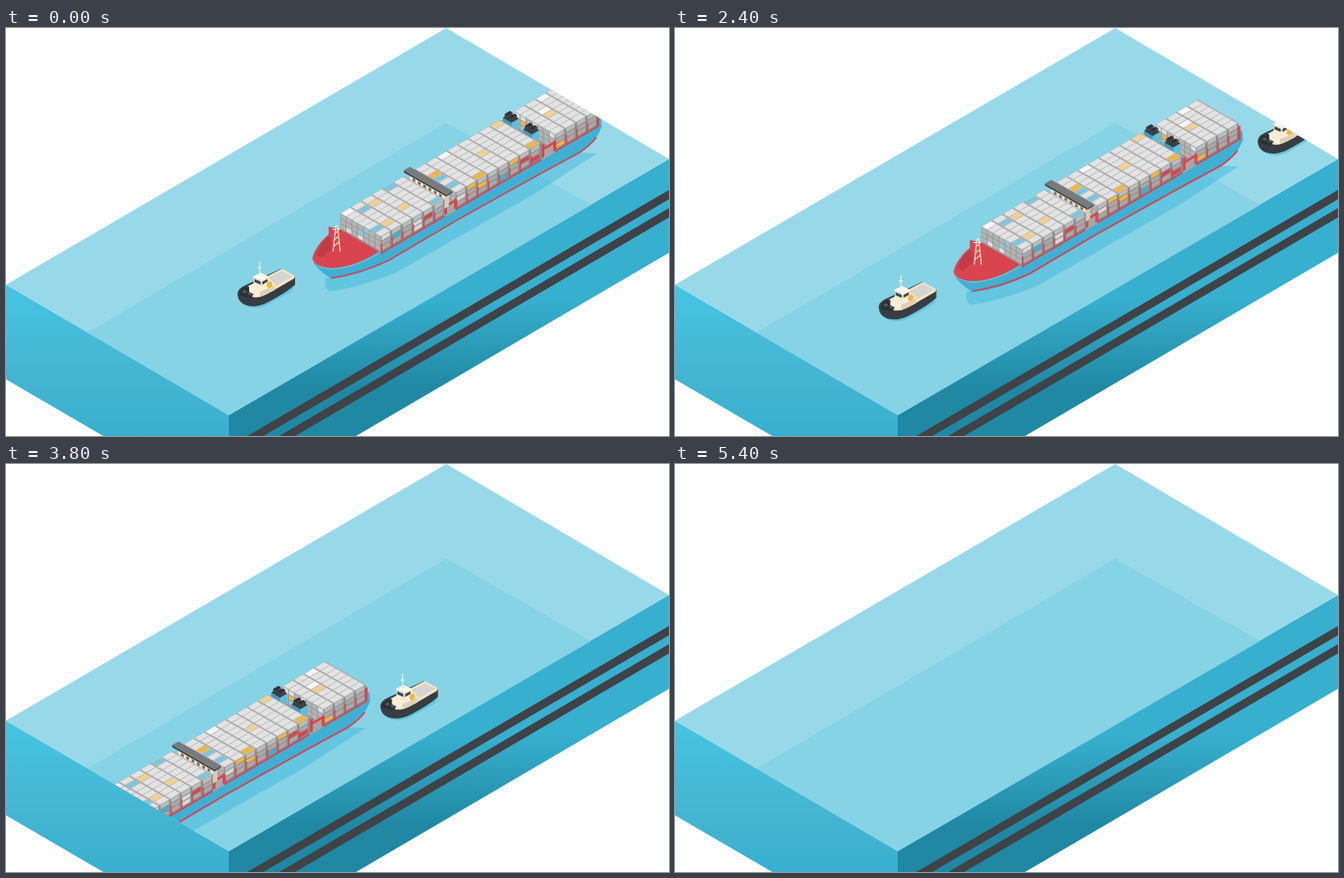
Animation, 750 px wide and 461 px high, one loop 5440 ms. Source, as an HTML page with a canvas:

```html
<!DOCTYPE html>
<html lang="en">
<head>
<meta charset="utf-8">
<title>Container ship and tugs</title>
<style>
html, body { margin: 0; width: 100%; height: 100%; overflow: hidden; background: #fff; }
canvas { display: block; }
</style>
</head>
<body>
<canvas id="stage" width="750" height="461"></canvas>
<script>
(() => {
const ctx = document.getElementById('stage').getContext('2d');
const LOOP = 5440, STEP = 40, SPEED_UP = 2430;
const RED = '#d9444e', BLUE = '#3fb0d3', CREAM = '#f3e5c9', ORANGE = '#f0b545', DARK = '#3e4347';
const WIDTH = 46, HEIGHT = 18;

let seed = 1;
function rnd() {
  seed = (seed * 16807) % 2147483647;
  return seed / 2147483647;
}

function poly(color, ...pts) {
  ctx.beginPath();
  pts.forEach(p => ctx.lineTo(p[0], p[1]));
  ctx.closePath();
  ctx.fillStyle = color;
  ctx.fill();
}

function fill(color, d) {
  ctx.fillStyle = color;
  ctx.fill(new Path2D(d));
}

function stroke(color, width, d) {
  ctx.strokeStyle = color;
  ctx.lineWidth = width;
  ctx.stroke(new Path2D(d));
}

// Ship axes: u runs aft, v runs to the near side, z runs up.
const iso = (u, v, z) => [217 + u + v, 304 - 0.585 * u + 0.57 * v - z];

const roof = (c, u0, u1, v0, v1, z) =>
  poly(c, iso(u0, v0, z), iso(u1, v0, z), iso(u1, v1, z), iso(u0, v1, z));
const side = (c, u0, u1, v, z0, z1) =>
  poly(c, iso(u0, v, z0), iso(u1, v, z0), iso(u1, v, z1), iso(u0, v, z1));
const front = (c, u, v0, v1, z0, z1) =>
  poly(c, iso(u, v0, z0), iso(u, v1, z0), iso(u, v1, z1), iso(u, v0, z1));

function box(u0, u1, v0, v1, z0, z1, colors) {
  side(colors[2], u0, u1, v1, z0, z1);
  front(colors[1], u0, v0, v1, z0, z1);
  roof(colors[0], u0, u1, v0, v1, z1);
}

function pick(list, plain, chance) {
  return rnd() < chance ? list[Math.floor(rnd() * list.length)] : plain;
}

function stack(u0, bays) {
  const bay = 12, cols = 7, cw = WIDTH / cols, u1 = u0 + bays * bay;
  box(u0, u1, 0, WIDTH, -HEIGHT, 0, ['#a8a8a8', '#979797', '#8b8b8b']);

  for (let r = 0; r < 3; r++) {
    for (let c = 0; c < cols; c++) {
      const z = -0.5 - r * 5.6;
      front(pick(['#8ccbdc', ORANGE, '#dedede'], '#b4b4b4', 0.25),
        u0, c * cw + 0.5, (c + 1) * cw - 0.5, z - 4.6, z);
    }
  }

  for (let b = bays - 1; b >= 0; b--) {
    const a = u0 + b * bay;
    for (let r = 0; r < 3; r++) {
      const z = -0.5 - r * 5.6;
      side(pick([BLUE, RED, ORANGE, '#d8d8d8'], r ? '#a9a9a9' : '#bcbcbc', 0.17),
        a + 0.8, a + bay - 1.6, WIDTH, z - 4.5, z);
    }
    side(RED, a, a + 1.6, WIDTH, -HEIGHT - 2, -8);
    for (let c = 0; c < cols; c++) {
      const v = c * cw;
      roof('#c6c6c6', a + 0.4, a + bay - 1, v, v + cw, 0);
      roof(pick([ORANGE, '#7cc6dc', '#f6f6f6', '#7cc6dc', '#f2d18e'], '#e3e3e3', 0.2),
        a + 0.6, a + bay - 1.4, v + 0.4, v + cw - 0.7, 0);
    }
  }
  side(RED, u0, u1, WIDTH, -HEIGHT - 2, -HEIGHT);
}

function funnel(v) {
  box(181, 189, v, v + 10, -9, 4, ['#34383c', '#3a9dbd', '#59bfdb']);
  front('#2d5666', 181, v + 1.5, v + 8.5, -2, 0);
  box(182, 188, v + 1, v + 4, 4, 8, ['#2c3034', DARK, DARK]);
  box(182, 188, v + 6, v + 9, 4, 8, ['#2c3034', DARK, DARK]);
}

function bridge() {
  box(75, 80, 4, 43, -14, 3, [CREAM, CREAM, '#d9ccb3']);
  for (let v = 7; v < 40; v += 6) front('#6d6b66', 75, v, v + 3, -3, 0);
  box(73, 80, -1, 47, 3, 5.5, ['#777b7e', '#43474b', '#53575b']);
}

function gap(u0, u1) {
  roof('#8e9092', u0, u1, 0, WIDTH, -HEIGHT);
  side('#a7a7a7', u0, u1, WIDTH, -HEIGHT - 2, -8);
  side(RED, u0, u1, WIDTH, -10, -7);
  side(RED, u0, u0 + 3, WIDTH, -HEIGHT, -3);
  side(RED, u1 - 2, u1, WIDTH, -HEIGHT, -6);
}

function ship() {
  seed = 4271;
  fill('rgba(52,178,214,0.42)',
    'M200 378 Q199 388 204 392 Q228 391 280 371 L440 280 L508 236 L488 235 L350 311 L270 358 Z');
  fill(BLUE,
    'M185 354 Q187 365 207 378 Q240 374 272 358 L350 312 L440 262 L488 236 Q506 224 513 206 L512 195 L262 340 Z');
  stroke(RED, 1.8, 'M207 377 Q240 372 272 357 L350 311 L440 261 L488 235 Q500 227 507 218');
  fill(RED,
    'M204 319 L218 322 L263 345 Q242 360 222 364 Q200 368 188 361 Q183 354 190 344 Q196 334 204 328 Z');
  fill('#c03c47', 'M204 330 L207 331 L207 345 L196 354 L190 351 Q194 338 204 330 Z');
  stroke('#b4bdc3', 0.8, 'M185 355 Q188 365 208 367 Q230 366 262 349');

  stack(197, 4);
  side(RED, 244, 247, WIDTH, -HEIGHT - 2, -4);
  gap(182, 197);
  funnel(3);
  funnel(26);
  stack(85, 8);
  gap(72, 85);
  bridge();
  stack(0, 6);

  stroke(CREAM, 1.2, 'M209 347 L212 318 L214 318 L217 347 M210 341 L216 336 M210 334 L215 330 M211 327 L215 323 M208 322 H217');
}

function tug() {
  fill('rgba(52,178,214,0.45)', 'M264 306 Q270 320 292 315 L324 297 L327 288 Z');
  fill('#383d42',
    'M262 302 Q261 295 270 291 L311 272 L327 281 V290 Q317 299 296 310 Q282 317 271 313 Q263 310 262 302 Z');
  fill(CREAM, 'M273 292 L312 272 L327 280 L326 283 L300 298 Q287 306 279 304 Z');
  fill('#d5d4d0', 'M297 282 L312 274.5 L324 280.5 L306 291 Z');
  fill('#2b3035', 'M264 300 Q265 294 274 292 L283 298 L277 304 Q267 306 264 300 Z');
  fill('#555b60', 'M267 298 l3 -2 l3 2 l-3 2 Z M273 300 l3 -2 l3 2 l-3 2 Z');
  fill('#f8eed8', 'M275 292 L288 286 L304 292 V296 L286 304 L275 298 Z');
  fill('#dfd0b3', 'M287 298 L304 291 V296 L287 304 Z');
  fill('#f7ecd5', 'M280 282 L288 285 L297 281 V290 L289 295 L280 290 Z');
  fill('#41484e', 'M281 283.5 L288 286.5 V290 L281 287 Z M290 286.5 L296 283.5 V286.5 L290 290 Z');
  fill('#fff9ea', 'M279 281 L288 276.5 L298 281 L289 285.5 Z');
  fill(ORANGE, 'M295 288 L299 286 L301 288 V292 L297 294 L295 292 Z');
  stroke('#f2eee3', 1.2, 'M287 264 V280 M284.5 271 H289.5');
}

function water() {
  ctx.fillStyle = '#fff';
  ctx.fillRect(0, 0, 750, 461);

  const left = ctx.createLinearGradient(0, 290, 0, 461);
  left.addColorStop(0, '#45c5e3');
  left.addColorStop(0.6, '#45b5d1');
  left.addColorStop(1, '#38b0d0');
  poly(left, [0, 290], [252, 437], [252, 461], [110, 461], [0, 397]);

  const right = ctx.createLinearGradient(0, 308, 0, 408);
  right.addColorStop(0, '#37afcf');
  right.addColorStop(1, '#2088a3');
  poly(right, [252, 437], [750, 148], [750, 254], [396, 461], [252, 461]);
  poly('#3f4246', [750, 183], [750, 193.5], [291, 461], [273, 461]);
  poly('#3f4246', [750, 203.5], [750, 214], [327, 461], [309, 461]);

  poly('#98d9e9', [0, 290], [498, 0], [750, 148], [252, 437.5]);
  poly('#86d3e6', [498, 107], [662, 200], [252, 437.5], [92, 344]);
}

function at(x, y, draw) {
  ctx.save();
  ctx.translate(x, y);
  draw();
  ctx.restore();
}

function render(t) {
  const slow = Math.min(t, SPEED_UP), fast = Math.max(0, t - SPEED_UP);
  const x = -0.0131 * slow - 0.168 * fast;
  const y = 0.0062 * slow + 0.1035 * fast;

  water();
  ctx.save();
  ctx.clip(new Path2D('M0 290 L498 0 L750 148 L252 437.5 Z'));
  if (t > 2240) at((4760 - t) * 0.1683, 73 - (4760 - t) * 0.104, tug);
  at(161 + x, y - 94.5, ship);
  at(x, y, tug);
  ctx.restore();
}

const start = performance.now();
function tick() {
  const t = (performance.now() - start) % LOOP;
  render(Math.floor(t / STEP) * STEP);
  requestAnimationFrame(tick);
}
tick();
})();
</script>
</body>
</html>
```
